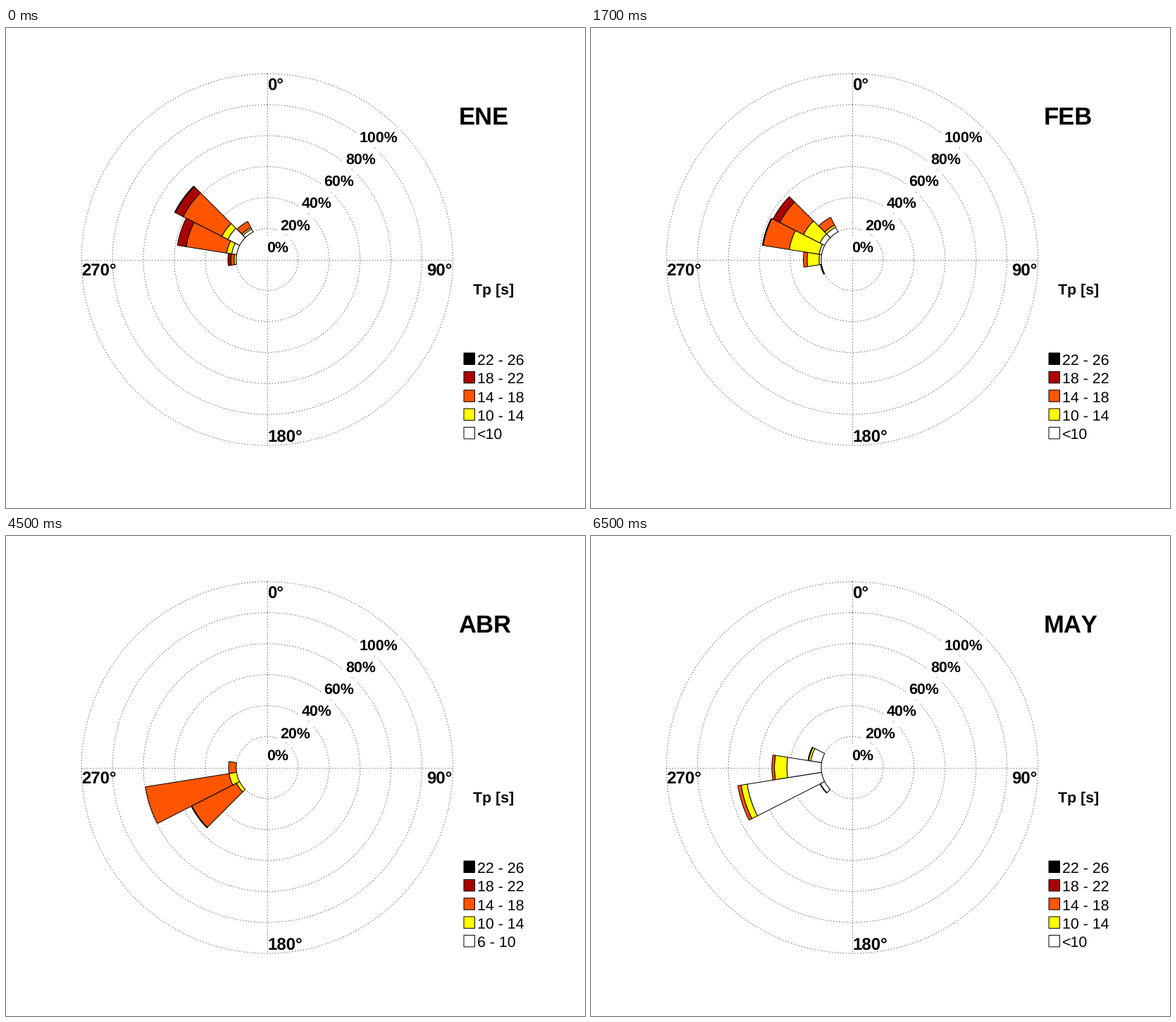
Animation of 822 by 681 pixels, one loop 8 s. Source, as a matplotlib script:

```python
import numpy as np
import matplotlib.pyplot as plt
from matplotlib.animation import FuncAnimation
from matplotlib.patches import Circle, Polygon, Rectangle

W, H, DPI = 822, 681, 72  # at 72 dpi one point is one pixel
CX, CY, STEP = 370.8, 328.5, 43.95
BIN = 18

plt.rcParams.update({
    "font.family": "Liberation Sans",
    "text.hinting": "none",
    "text.kerning_factor": 6,
})

COLORS = {
    "k": "#000000",
    "r": "#aa0000",
    "o": "#ff5500",
    "y": "#ffff00",
    "w": "#ffffff",
}

# Per month: title, lowest class, {bearing: [(colour, outer radius), ...]}
MONTHS = [
    ("ENE", "<10", {
        324: [("w", 48.5), ("y", 51), ("o", 60.7)],
        306: [("w", 62.8), ("y", 72.3), ("o", 134), ("r", 146.5), ("k", 147.5)],
        288: [("w", 51), ("y", 58.3), ("o", 116.5), ("r", 129)],
        270: [("y", 47), ("o", 51.5), ("r", 55.8)],
    }),
    ("FEB", "<10", {
        324: [("w", 51.5), ("y", 55), ("o", 67.3)],
        306: [("w", 51.5), ("y", 77.7), ("o", 115.5), ("r", 126.2)],
        288: [("w", 47.5), ("y", 90.5), ("o", 128), ("k", 129)],
        270: [("w", 47), ("y", 64), ("o", 69.3)],
        252: [("k", 45.5)],
    }),
    ("MAR", "6 - 10", {
        342: [("w", 58.3)],
        324: [("w", 53), ("o", 55)],
        306: [("o", 64.3), ("r", 71.5)],
        288: [("o", 75.5), ("k", 76.3)],
        270: [("o", 84.9), ("k", 85.8)],
        252: [("y", 59.7), ("o", 126.6), ("k", 127.5)],
        234: [("y", 48), ("o", 51.5)],
    }),
    ("ABR", "6 - 10", {
        270: [("o", 54.8)],
        252: [("y", 54.8), ("o", 175)],
        234: [("y", 49), ("o", 120), ("k", 121)],
    }),
    ("MAY", "<10", {
        288: [("w", 59.5), ("y", 62.6), ("k", 63.6)],
        270: [("w", 92.7), ("y", 110.3), ("o", 114)],
        252: [("w", 151), ("y", 159.7), ("o", 164.3)],
        234: [("w", 50.6), ("k", 51.3)],
    }),
]

fig = plt.figure(figsize=(W / DPI, H / DPI), dpi=DPI, facecolor="white")
ax = fig.add_axes([0, 0, 1, 1])
ax.set_xlim(0, W)
ax.set_ylim(H, 0)
ax.axis("off")


def label(x, y, text, size, weight="bold"):
    return ax.text(x, y, text, fontsize=size, weight=weight,
                   ha="left", va="baseline", zorder=5)


def sector(bearing, inner, outer, color):
    a = np.radians(np.linspace(bearing - BIN / 2, bearing + BIN / 2, 25))
    angle = np.concatenate([a, a[::-1]])
    radius = np.repeat([outer, inner], a.size)
    points = np.column_stack([CX + radius * np.sin(angle),
                              CY - radius * np.cos(angle)])
    return ax.add_patch(Polygon(points, fc=color, ec="black", lw=1,
                                joinstyle="miter", zorder=3))


def draw_grid():
    dots = dict(color="black", lw=0.8, ls=(0, (1.25, 3.75)), zorder=1)
    reach = 6 * STEP
    ax.plot([CX - reach, CX + reach], [CY, CY], dash_capstyle="butt", **dots)
    ax.plot([CX, CX], [CY - reach, CY + reach], dash_capstyle="butt", **dots)
    for k in range(1, 7):
        ax.add_patch(Circle((CX, CY), k * STEP, fill=False, capstyle="butt",
                            **dots))

    # Ring labels sit on white boxes, top right corner on the 45 degree ray
    for k in range(6):
        text = f"{20 * k}%"
        width = 21.33 * (0.556 * (len(text) - 1) + 0.889)
        offset = (k + 1) * STEP * np.sqrt(0.5)
        right, top = CX + offset - 1.2, CY - offset - 1
        ax.add_patch(Rectangle((right - width - 4, top), width + 8, 28,
                               fc="white", ec="none", zorder=2))
        label(right - width, top + 21, text, 21.33)

    for x, y, text in [(371, 88.5, "0°"), (597.5, 352, "90°"),
                       (371, 587.5, "180°"), (107, 352, "270°")]:
        label(x, y, text, 24)


def draw_legend():
    label(663, 377.5, "Tp [s]", 21.33)
    names = ["22 - 26", "18 - 22", "14 - 18", "10 - 14", "<10"]
    rows = []
    for i, (name, color) in enumerate(zip(names, COLORS.values())):
        y = 469.3 + 26.35 * i
        ax.add_patch(Rectangle((650, y - 8.3), 15.5, 16.5, fc=color,
                               ec="black", lw=1, snap=False, zorder=3))
        rows.append(label(669, y + 8.5, name, 21.33, "normal"))
    return rows[-1]


draw_grid()
lowest = draw_legend()
title = label(642.3, 137, "", 34.67)
sectors = []


def update(frame):
    name, low_class, rose = MONTHS[(frame + 3) // 4]
    title.set_text(name)
    lowest.set_text(low_class)
    while sectors:
        sectors.pop().remove()
    for bearing, stack in rose.items():
        inner = STEP
        for key, outer in stack:
            sectors.append(sector(bearing, inner, outer, COLORS[key]))
            inner = outer
    return [title, lowest, *sectors]


anim = FuncAnimation(fig, update, frames=16, init_func=lambda: update(0),
                     interval=500, repeat=True, repeat_delay=0, blit=False)
plt.show()
```
